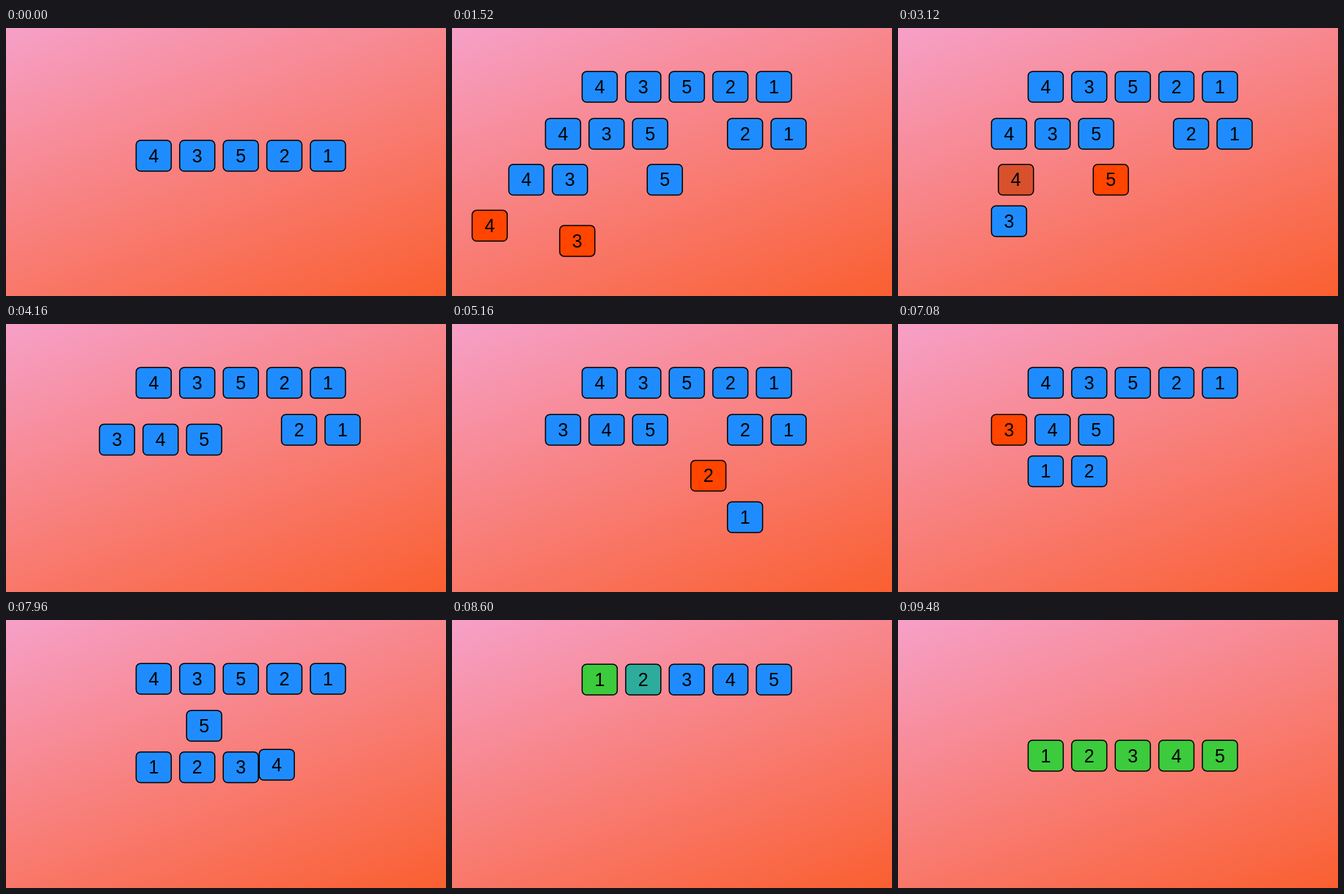
An HTML page that plays this animation: 600 px wide and 365 px high, repeating every 9520 ms.

```html
<!DOCTYPE html>
<html lang="en">
<head>
<meta charset="utf-8">
<title>Merge sort</title>
<style>
  html, body { margin: 0; width: 100%; height: 100%; overflow: hidden; }
  body { background: linear-gradient(160deg, #f6a0c8, #fa5f30); }
  svg { display: block; width: 600px; height: 365px; }
  rect { stroke: #000; stroke-width: 1.5; }
  text { font: 25px "Liberation Sans", Arial, sans-serif; text-anchor: middle; }
</style>
</head>
<body>
<svg id="stage" viewBox="0 0 600 365"></svg>
<script>
const LOOP = 9520;
const STEP = 302;
const PITCH = 59.4;
const BOX = { w: 49.4, h: 43.4 };
const LEVELS = [58.4, 122.4, 184.9, 247.6];
const OUTPUT_DROP = 56.5;
const REST_Y = 163;
const LEFT = 176.7;
const BLUE = [30, 140, 255], RED = [255, 69, 0], GREEN = [60, 203, 60];
// Pause before the leftover items of a merge, by list length.
const DRAIN = { 2: 30, 3: 120, 5: 468 };

const stage = document.getElementById('stage');
const tokens = [];
let clock = -88;

const node = (tag, attrs, parent) => {
  const el = document.createElementNS('http://www.w3.org/2000/svg', tag);
  for (const key in attrs) el.setAttribute(key, attrs[key]);
  return parent.appendChild(el);
};

function makeToken(value, x, y, from) {
  const group = node('g', {}, stage);
  const rect = node('rect', { x: .75, y: .75, width: BOX.w - 1.5, height: BOX.h - 1.5, rx: 6 }, group);
  node('text', { x: BOX.w / 2, y: 30.5 }, group).textContent = value;
  const token = { value, group, rect, from, until: Infinity, place: [x, y], pos: [], tint: [] };
  token.pos.push({ at: from, length: 1, to: token.place });
  token.tint.push({ at: from, length: 1, to: BLUE });
  tokens.push(token);
  return token;
}

function move(token, x, y, length = STEP) {
  token.place = [x, y];
  token.pos.push({ at: clock, length, to: token.place });
}

function tint(token, to, at, length) {
  token.tint.push({ at, length, to });
}

function mergeSort(row, x, depth) {
  const n = row.length;
  if (n < 2) return row;
  const mid = Math.ceil(n / 2);
  const childY = LEVELS[depth + 1];
  const rightX = x + mid * PITCH + (n % 2 ? 20 : 50);

  const split = (part, px) => part.map((parent, i) => {
    const child = makeToken(parent.value, ...parent.place, clock);
    move(child, px + i * PITCH, childY);
    return child;
  });
  let left = split(row.slice(0, mid), x - 50);
  let right = split(row.slice(mid), rightX);
  clock += STEP;
  left = mergeSort(left, x - 50, depth + 1);
  right = mergeSort(right, rightX, depth + 1);

  const merged = [];
  const take = list => {
    const token = list.shift();
    move(token, x + merged.length * PITCH, childY + OUTPUT_DROP);
    if (token.marked) tint(token, BLUE, clock + STEP * .6, STEP * .4);
    token.marked = false;
    merged.push(token);
    clock += STEP;
  };

  while (left.length && right.length) {
    for (const head of [left[0], right[0]]) {
      if (head.marked) continue;
      head.marked = true;
      tint(head, RED, clock, n === 2 ? 265 : STEP);
    }
    clock += n === 2 ? 265 : STEP;
    take(left[0].value < right[0].value ? left : right);
  }
  clock += DRAIN[n];
  while (left.length) take(left);
  while (right.length) take(right);

  row.forEach(token => token.until = clock);
  merged.forEach((token, i) => move(token, x + i * PITCH, LEVELS[depth]));
  clock += STEP;
  return merged;
}

function schedule() {
  const row = [4, 3, 5, 2, 1].map((v, i) => makeToken(v, LEFT + i * PITCH, REST_Y, clock - 1));
  row.forEach(token => move(token, token.place[0], LEVELS[0]));
  clock += STEP;
  mergeSort(row, LEFT, 0).forEach((token, i) => {
    tint(token, GREEN, clock - 240 + i * 100, 200);
    move(token, token.place[0], REST_Y, 600);
  });
}

const ease = p => p < .5 ? 4 * p ** 3 : 1 - 4 * (1 - p) ** 3;

function sample(track, time) {
  let value = track[0].to;
  for (const { at, length, to } of track) {
    if (time <= at) break;
    const p = ease(Math.min(1, (time - at) / length));
    value = value.map((v, i) => v + (to[i] - v) * p);
  }
  return value;
}

function draw(time) {
  for (const { group, rect, from, until, pos, tint } of tokens) {
    const shown = time >= from && time < until;
    group.setAttribute('visibility', shown ? 'visible' : 'hidden');
    if (!shown) continue;
    group.setAttribute('transform', `translate(${sample(pos, time)})`);
    rect.setAttribute('fill', `rgb(${sample(tint, time).map(Math.round)})`);
  }
}

schedule();
const start = performance.now();
function frame() {
  draw((performance.now() - start) % LOOP);
  requestAnimationFrame(frame);
}
frame();
</script>
</body>
</html>
```
